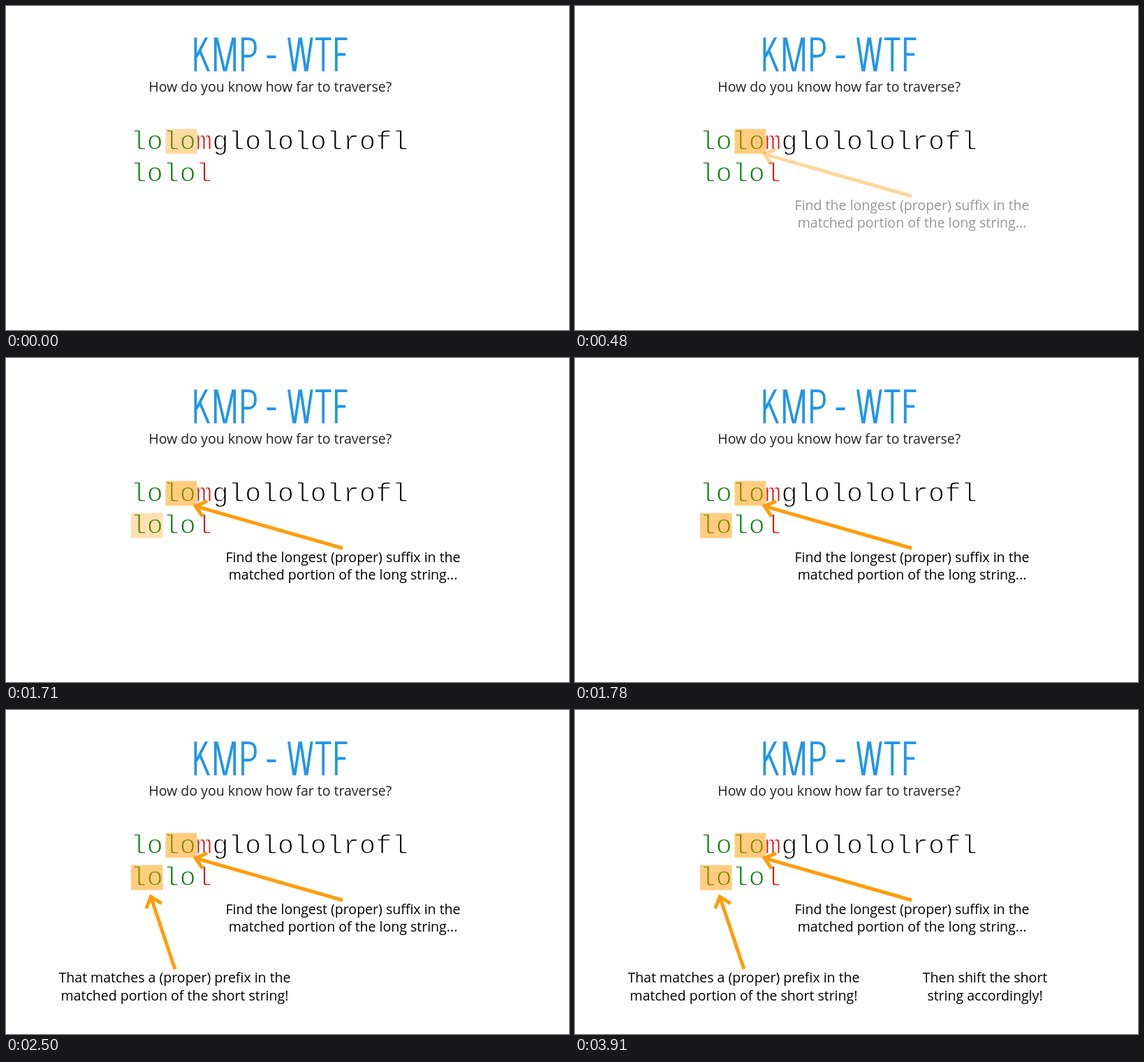
Write an HTML page with a canvas that moves like this. It is 806 px wide and 465 px high and loops after 4900 ms.

```html
<!DOCTYPE html>
<html lang="en">
<head>
<meta charset="utf-8">
<title>KMP - WTF</title>
<style>
  html, body { margin: 0; width: 100%; height: 100%; overflow: hidden; background: #fff; }
  canvas { display: block; width: 806px; height: 465px; }
</style>
</head>
<body>
<canvas id="stage" role="img" aria-label="KMP - WTF: How do you know how far to traverse?"></canvas>
<script>
const W = 806, H = 465, LOOP = 4900;
const BLUE = '#2196e8', GREEN = '#008000', RED = '#e01010', ORANGE = '#ff9c0a';
const BODY = '19.53px "Open Sans", "Noto Sans", sans-serif';
const MONO_SIZE = 39;
const MONO = MONO_SIZE + 'px "Liberation Mono", "Courier New", monospace';
const PITCH = MONO_SIZE * 0.6;

const canvas = document.getElementById('stage');
const ctx = canvas.getContext('2d');
const dpr = window.devicePixelRatio || 1;
canvas.width = W * dpr;
canvas.height = H * dpr;
ctx.scale(dpr, dpr);
ctx.lineJoin = 'miter';

// Narrow headline letters as strokes, trimmed to cap height by a clip
const headline = new Path2D([
  'M271.4 43V96M289.3 41L272.5 73M277.5 64L291.8 98',
  'M299.8 43V96M300.6 41L313.5 97M326.4 41L313.5 97M327.2 43V96',
  'M339 96V47H346C354 47 357 51 357 59.5S354 72 346 72H339',
  'M373.5 73H386.5',
  'M404.3 41L412.8 98L421.3 41L429.8 98L438.3 41',
  'M443 47H465.5M454.2 47V96',
  'M472.8 96V47H488.5M472.8 69.5H486'
].join(''));

// Each fade is a list of [time, opacity] held until the next entry
const fades = {
  suffixBox: [[0, 0.72], [90, 1]],
  suffixNote: [[480, 0.41], [570, 0.78], [640, 1]],
  prefixBox: [[1710, 0.6], [1780, 1]],
  prefixNote: [[2340, 0.52], [2430, 0.86], [2500, 1]],
  shiftNote: [[3660, 0.08], [3730, 0.37], [3820, 0.74], [3910, 1]]
};

function opacity(name, t) {
  let a = 0;
  for (const [time, value] of fades[name]) if (t >= time) a = value;
  return a;
}

function drawHeadline() {
  ctx.save();
  ctx.beginPath();
  ctx.rect(260, 45.2, 240, 48.6);
  ctx.clip();
  ctx.strokeStyle = BLUE;
  ctx.lineWidth = 3.8;
  ctx.stroke(headline);
  ctx.restore();
}

function centred(text, x, y, color = '#000') {
  ctx.font = BODY;
  ctx.textAlign = 'center';
  ctx.fillStyle = color;
  ctx.fillText(text, x, y);
}

// A white outline over the fill leaves thin typewriter strokes
function mono(runs, x, y) {
  ctx.font = MONO;
  ctx.textAlign = 'left';
  ctx.strokeStyle = '#fff';
  ctx.lineWidth = 1.3;
  for (const [text, color] of runs) {
    ctx.fillStyle = color;
    ctx.fillText(text, x, y);
    ctx.strokeText(text, x, y);
    x += text.length * PITCH;
  }
}

function highlight(x, y, w, h) {
  ctx.fillStyle = 'rgba(255, 153, 0, 0.5)';
  ctx.fillRect(x, y, w, h);
}

function arrow(x0, y0, x1, y1) {
  const len = Math.hypot(x0 - x1, y0 - y1);
  const dx = (x0 - x1) / len, dy = (y0 - y1) / len;
  const back = 14, side = 11.5;
  const bx = x1 + dx * back, by = y1 + dy * back;
  ctx.strokeStyle = ORANGE;
  ctx.lineWidth = 5;
  ctx.beginPath();
  ctx.moveTo(x0, y0);
  ctx.lineTo(x1, y1);
  ctx.moveTo(bx + dy * side, by - dx * side);
  ctx.lineTo(x1, y1);
  ctx.lineTo(bx - dy * side, by + dx * side);
  ctx.stroke();
}

function layer(name, t, draw) {
  const a = opacity(name, t);
  if (!a) return;
  ctx.globalAlpha = a;
  draw();
  ctx.globalAlpha = 1;
}

function render(t) {
  ctx.fillStyle = '#fff';
  ctx.fillRect(0, 0, W, H);

  drawHeadline();
  centred('How do you know how far to traverse?', 378.2, 122.7, '#222');
  mono([['lolo', GREEN], ['m', RED], ['glolololrofl', '#000']], 178.2, 205.8);
  mono([['lolo', GREEN], ['l', RED]], 178.2, 251.8);

  layer('suffixBox', t, () => highlight(228.5, 176.5, 45, 35.5));
  layer('prefixBox', t, () => highlight(179, 222.5, 45.5, 36));
  layer('suffixNote', t, () => {
    arrow(482, 273, 271.3, 212.7);
    centred('Find the longest (proper) suffix in the', 482.5, 293);
    centred('matched portion of the long string...', 482.5, 318);
  });
  layer('prefixNote', t, () => {
    arrow(242, 372, 207.3, 268);
    centred('That matches a (proper) prefix in the', 241.5, 391);
    centred('matched portion of the short string!', 241.5, 417);
  });
  layer('shiftNote', t, () => {
    centred('Then shift the short', 587, 391);
    centred('string accordingly!', 587, 417);
  });
}

const start = performance.now();
function tick() {
  render((performance.now() - start) % LOOP);
  requestAnimationFrame(tick);
}
tick();
</script>
</body>
</html>
```
